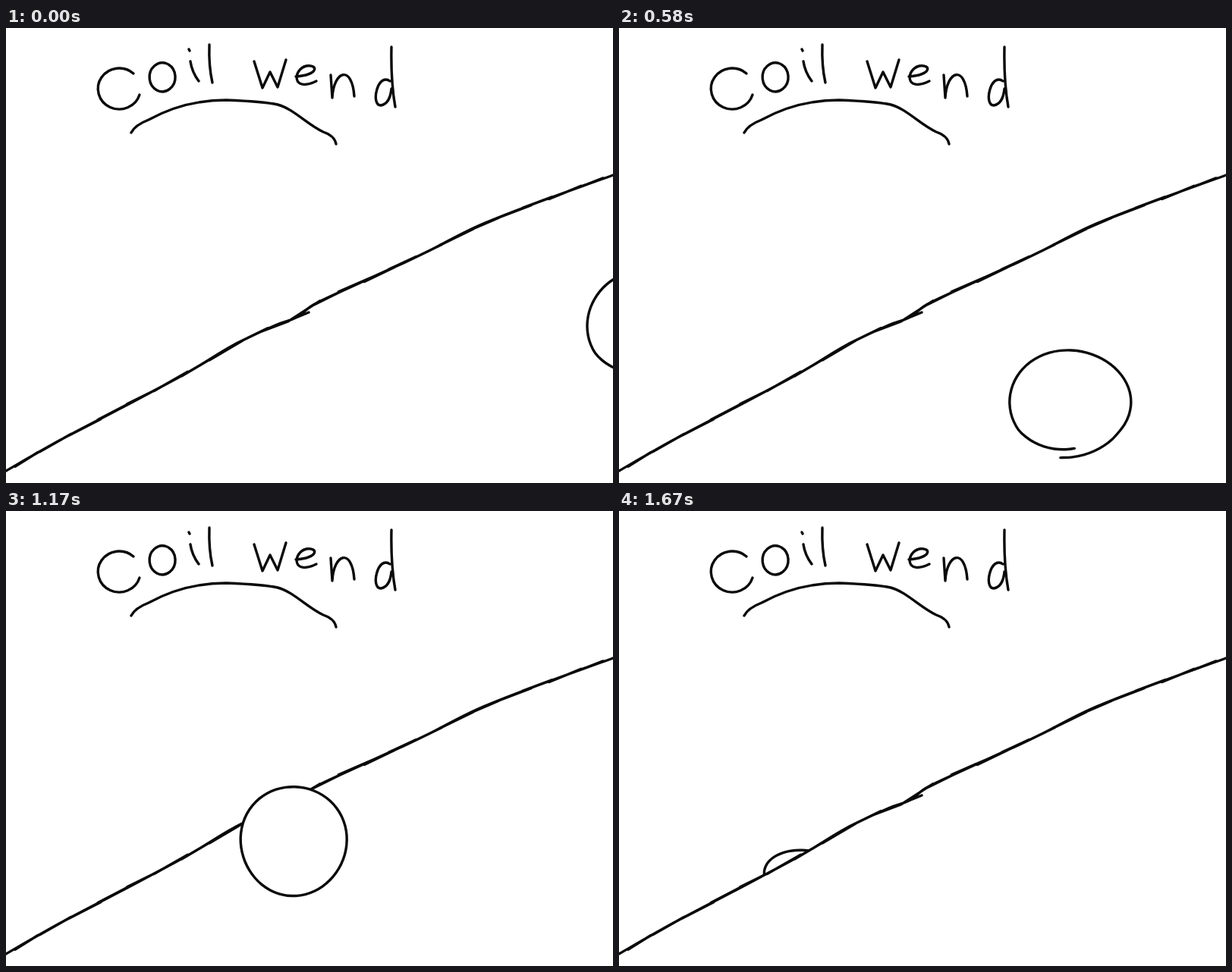
Recreate the animation shown at these times as an HTML page. Size 800 by 600 pixels, loop 1.76 s.

```html
<!DOCTYPE html>
<html lang="en">
<head>
<meta charset="utf-8">
<title>Coil wend</title>
<style>
  html, body { margin: 0; width: 100%; height: 100%; overflow: hidden; background: #fff; }
  svg { display: block; width: 100vw; height: 100vh; }
  path { fill: none; stroke: #0a0a0a; stroke-width: 3.4; stroke-linecap: round; stroke-linejoin: round; }
</style>
</head>
<body>
<svg viewBox="0 0 800 600" role="img" aria-label="Coil wend">
  <defs><clipPath id="above"><polygon id="sky"/></clipPath></defs>
  <g id="title">
    <path d="M168 60A28 27 0 1 0 176 88"/>
    <path d="M212 47A17 19 0 1 0 214 48"/>
    <path d="M243 44Q245 58 254 70M241 28L242 30"/>
    <path d="M268 22Q267 50 272 72"/>
    <path d="M327 44L338 79L348 58L358 78L369 42"/>
    <path d="M382 64C412 62 412 48 396 50C378 54 376 86 409 70"/>
    <path d="M428 62L430 92C432 56 456 48 459 90"/>
    <path d="M506 70C490 58 480 102 494 102Q506 100 508 80M508 25Q507 70 513 104"/>
    <path d="M165 138Q170 128 188 121Q235 95 290 95Q340 97 358 101C378 106 398 128 418 137Q433 142 435 153"/>
  </g>
  <path id="slope"/>
  <g id="mask"><path id="ball"/></g>
</svg>
<script>
const LOOP = 1760, FRAMES = 21;
const el = id => document.getElementById(id);
const clamp = v => Math.min(1, Math.max(0, v));

// Smooth curve through all points
function curve(p) {
  let d = 'M' + p[0];
  for (let i = 0; i < p.length - 1; i++) {
    const a = p[i - 1] || p[i], b = p[i], c = p[i + 1], e = p[i + 2] || c;
    const h1 = b.map((v, j) => v + (c[j] - a[j]) / 6);
    const h2 = c.map((v, j) => v - (e[j] - b[j]) / 6);
    d += `C${h1} ${h2} ${c}`;
  }
  return d;
}

let seed = 7;
const random = () => (seed = seed * 16807 % 2147483647) / 2147483647;
const jitter = size => (random() - 0.5) * size;

const hill = [
  [0, 584], [72, 543], [150, 502], [238, 455], [300, 418], [355, 392], [382, 382],
  [402, 367], [425, 355], [517, 313], [555, 295], [620, 262], [690, 234], [800, 194]
];

function hillY(x) {
  const i = Math.max(1, hill.findIndex(p => p[0] >= x));
  const [x0, y0] = hill[i - 1], [x1, y1] = hill[i];
  return y0 + (y1 - y0) * (x - x0) / (x1 - x0);
}

// One long line gone over with short, slightly skewed strokes
function drawSlope() {
  let d = curve(hill) + 'M382 382L399 375';
  for (let x = 12; x < 760; x += 30 + random() * 12) {
    const end = Math.min(800, x + 30 + random() * 15);
    d += `M${x} ${hillY(x) + jitter(2.5)}L${end} ${hillY(end) + jitter(2.5)}`;
  }
  el('slope').setAttribute('d', d);
  el('sky').setAttribute('points', [[0, 0], ...hill, [800, 0]].join(' '));
}

// Drawing number, centre, radii
const route = [
  [0, 836, 391, 70, 69], [5, 677, 471, 74, 69], [7, 594, 493, 80, 68], [10, 473, 504, 75, 62],
  [13, 396, 445, 70, 71], [14, 379, 435, 70, 72], [16, 313, 383, 71, 73], [20, 240, 478, 49, 31]
];

function along(k) {
  let i = 0;
  while (i < route.length - 2 && route[i + 1][0] <= k) i++;
  const b = route[i], c = route[i + 1];
  const a = route[i - 1] || b, e = route[i + 2] || c;
  const span = c[0] - b[0], u = (k - b[0]) / span;
  return [1, 2, 3, 4].map(j => {
    const m0 = (c[j] - a[j]) / (c[0] - a[0]) * span;
    const m1 = (e[j] - b[j]) / (e[0] - b[0]) * span;
    const u2 = u * u, u3 = u2 * u;
    return (2 * u3 - 3 * u2 + 1) * b[j] + (u3 - 2 * u2 + u) * m0
      + (3 * u2 - 2 * u3) * c[j] + (u3 - u2) * m1;
  });
}

// Wobbly hand-drawn loop whose ends miss each other until the ball reaches the slope
function outline(k) {
  const [x, y, rx, ry] = along(k);
  const gap = 0.09 * clamp((13 - k) / 3), n = 36;
  return curve(Array.from({ length: n + 1 }, (_, i) => {
    const u = i / n, a = (85 + 373 * u) * Math.PI / 180;
    const r = 1 + 0.01 * Math.sin(3 * a + 2 * k)
      - gap * clamp(1 - 6 * u) + gap * clamp(6 * u - 5);
    return [x + rx * r * Math.cos(a), y + ry * r * Math.sin(a)];
  }));
}

const startOf = k => Math.round(k * 100 / 12) * 10;

function render(t) {
  let k = FRAMES - 1;
  while (startOf(k) > t) k--;
  const ball = el('ball');
  ball.setAttribute('d', outline(k));
  // Rolls over the slope, then drops behind it
  ball.style.fill = k >= 14 && k <= 16 ? '#fff' : 'none';
  el('mask').setAttribute('clip-path', k > 16 ? 'url(#above)' : 'none');
}

let start;
function tick(now) {
  start ??= now;
  render((now - start) % LOOP);
  requestAnimationFrame(tick);
}
drawSlope();
render(0);
requestAnimationFrame(tick);
</script>
</body>
</html>
```
